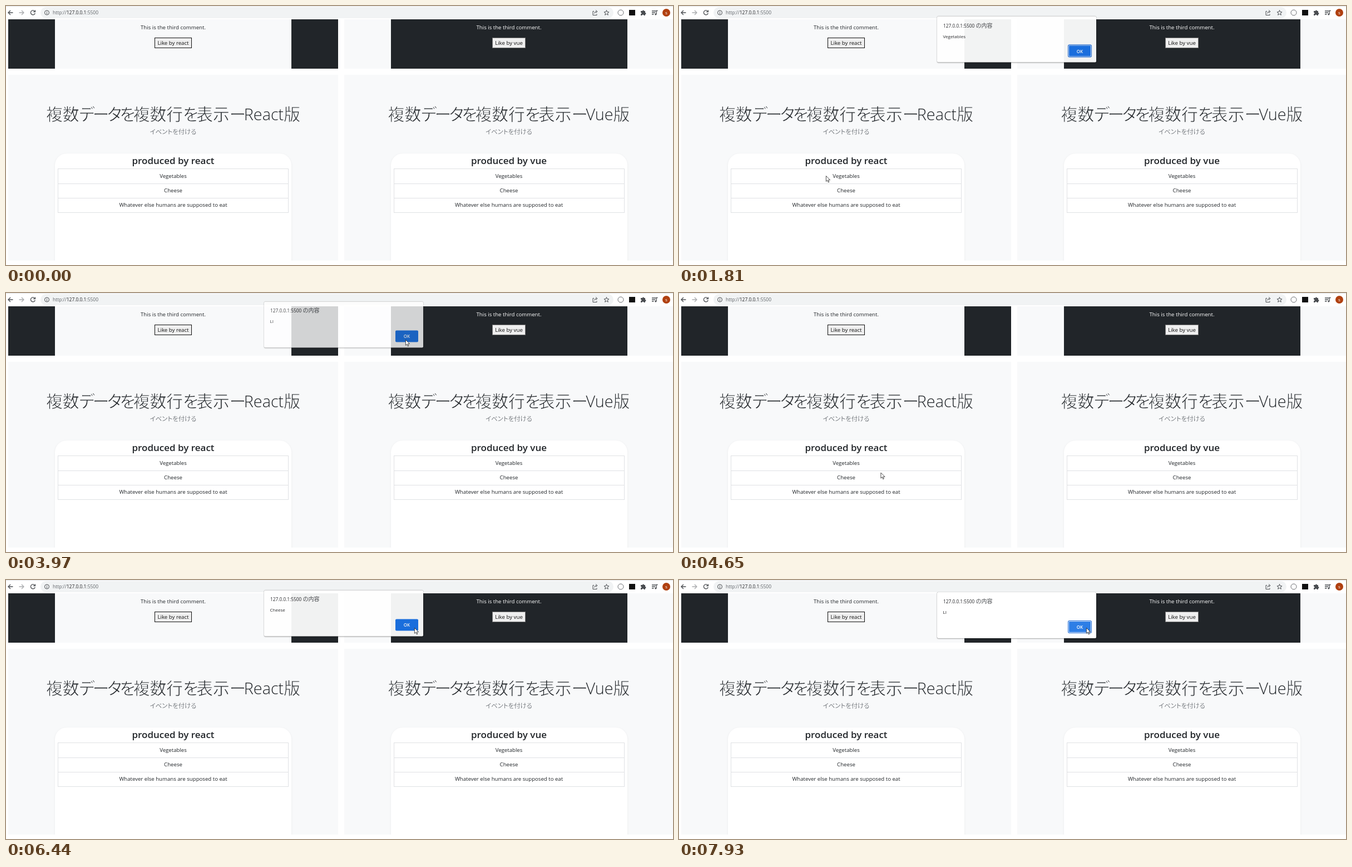
An HTML page for the animation above (8 s loop, 1199 px wide and 467 px high).

```html
<!DOCTYPE html>
<html lang="ja">
<head>
<meta charset="utf-8">
<title>List events</title>
<style>
html, body { margin: 0; width: 100%; height: 100%; overflow: hidden; background: #fff; }
body { position: relative; font: 9.65px/20px "Open Sans", "Noto Sans", sans-serif; color: #212529; }
div { position: absolute; box-sizing: border-box; white-space: nowrap; }
svg { position: absolute; left: 0; top: 0; overflow: visible; }

#bar { left: 0; top: 0; width: 1199px; height: 24px; background: #fff; border-top: 1px solid #e3e5e8; }
#pill { left: 62px; top: 2px; width: 1030px; height: 20px; border-radius: 10px; background: #f1f3f4; }
#url { left: 84px; top: 2px; font-size: 8.45px; color: #5f6368; }
#url b { font-weight: 400; color: #202124; }
#avatar { left: 1180px; top: 5px; width: 14px; height: 14px; border-radius: 50%; background: #b0400f; color: #fff; font-size: 8px; line-height: 13px; text-align: center; }

.col { top: 0; width: 593px; height: 467px; }
.upper { left: 0; top: 24px; width: 593px; height: 89px; }
.lower { left: 0; top: 124px; width: 593px; height: 335px; background: #f8f9fa; overflow: hidden; }
.panel { left: 84px; top: 0; width: 425px; height: 89px; text-align: center; }
.dark { background: #212529; color: #fff; }
.light { background: #f8f9fa; color: #212529; }
.note { left: 0; top: 5px; width: 100%; }
.like { top: 33px; height: 19px; line-height: 17px; font-size: 9.7px; text-align: center; background: #efefef; color: #111; }
.react .like { left: 179px; width: 67px; border: 1.4px solid #111; }
.vue .like { left: 182.5px; width: 60px; border: 1px solid #767676; }

.title, .sub { left: 0; width: 593px; text-align: center; font-family: "Noto Sans CJK JP", "Noto Sans CJK", sans-serif; font-weight: 300; }
.title { top: 49px; font-size: 29.8px; line-height: 40px; }
.title i { font-style: normal; font-feature-settings: "palt"; letter-spacing: -3.4px; }
.title b { font: 300 28.8px/40px "Open Sans", "Noto Sans", sans-serif; }
.sub { top: 92px; font-size: 11.4px; font-feature-settings: "palt"; color: #3c4248; }
.thin .title { -webkit-text-stroke: .85px #f8f9fa; }
.thin .title b { -webkit-text-stroke: 0; }
.thin .sub { -webkit-text-stroke: .3px #f8f9fa; }
.card { left: 84px; top: 142px; width: 425px; height: 230px; border-radius: 21px; background: #fff; box-shadow: 0 1px 4px rgba(0, 0, 0, .06); text-align: center; }
.head { left: 0; top: 2px; width: 100%; font-size: 17px; line-height: 21px; font-weight: 600; }
.list { left: 5px; top: 27px; width: 415px; height: 80px; border: 1px solid #dfe1e4; }
.row { left: 0; width: 100%; height: 27px; line-height: 26px; border-bottom: 1px solid #dfe1e4; }
.row:last-child { border: 0; }

#dialog { left: 464px; top: 22px; width: 286px; height: 83px; background: #fff; border-radius: 2px; box-shadow: 0 0 1px rgba(0, 0, 0, .6), 0 1px 2px rgba(0, 0, 0, .3); color: #202124; }
#name { left: 11px; top: 7px; font-size: 8.3px; }
#name i { font: 300 10px "Noto Sans CJK JP", "Noto Sans CJK", sans-serif; color: #44474b; }
#text { left: 10.5px; top: 26px; font-size: 8px; }
#ok { left: 236px; top: 52px; width: 41px; height: 21px; border-radius: 2px; line-height: 21px; font-size: 8px; font-weight: 600; text-align: center; color: #fff; }
#ok.ring { box-shadow: inset 0 0 0 1px #e6f0fd, 0 0 0 1px #1a66d2; }
#tap { width: 16px; height: 16px; margin: -8px; border-radius: 50%; background: rgba(212, 226, 24, .62); }
</style>
</head>
<body>
<div id="bar"></div>
<div id="pill"></div>
<svg width="1199" height="24" fill="none" stroke="#4a4d51" stroke-width="1.3">
  <path d="M12.500 12H4M8 8 4 12 8 16"/>
  <path d="M23.500 12H32M28 8 32 12 28 16" stroke="#a9abae"/>
  <path d="M51.500 9.300A4 4 0 1 0 52.300 13M52.500 7.500V10.500H49.300"/>
  <g stroke-width="1">
    <circle cx="73.500" cy="12" r="4"/>
    <path d="M73.500 11.500V14.500M73.500 9.500V10.500"/>
    <path d="M1057 9.500H1055V16.500H1062V14.500M1057.500 13.500Q1058 10 1061.500 10M1060 7.500 1063 10 1060 12.500"/>
    <path d="M1079.500 7.500 1080.700 10.700 1084 10.900 1081.400 13 1082.300 16.300 1079.500 14.400 1076.700 16.300 1077.600 13 1075 10.900 1078.300 10.700Z"/>
    <circle cx="1105" cy="12" r="5" stroke="#6d7074"/>
  </g>
  <path d="M1120 7H1131V17H1120Z" fill="#111" stroke="none"/>
  <path d="M1141 9H1144A1.500 1.500 0 0 1 1147 9H1149V12A1.500 1.500 0 0 1 1149 15V17H1146.500A1.500 1.500 0 0 0 1143.500 17H1141V14.500A1.500 1.500 0 0 0 1141 11.500Z" fill="#4a4d51" stroke="none"/>
  <path d="M1161 9H1168M1161 12H1167M1161 15H1164.500M1169 15V8.500H1171.500"/>
  <circle cx="1167.800" cy="15" r="1.500" fill="#4a4d51" stroke="none"/>
</svg>
<div id="url">http://<b>127.0.0.1</b>:5500</div>
<div id="avatar">s</div>

<div id="dialog">
  <div id="name">127.0.0.1:5500 <i>の内容</i></div>
  <div id="text"></div>
  <div id="ok">OK</div>
</div>
<div id="tap"></div>
<svg id="cursor" width="9" height="13">
  <path d="M.4.4V10.300L2.700 8.200 4.300 12 5.900 11.300 4.300 7.700H7.600Z" fill="#fff" stroke="#222" stroke-width=".8"/>
</svg>

<script>
const $ = id => document.getElementById(id);
const clamp = u => Math.max(0, Math.min(1, u));
const smooth = u => u * u * (3 - 2 * u);
const LOOP = 8000;

// Page columns
const items = ['Vegetables', 'Cheese', 'Whatever else humans are supposed to eat'];

function column(left, label, outer, inner) {
  const name = label.toLowerCase();
  const rows = items.map((s, i) => `<div class="row" style="top:${i * 26.2}px">${s}</div>`).join('');
  return `<div class="col ${name}" style="left:${left}px">
    <div class="upper ${outer}"><div class="panel ${inner}">
      <div class="note">This is the third comment.</div>
      <div class="like">Like by ${name}</div>
    </div></div>
    <div class="lower">
      <div class="title">複数<i>データを</i>複数行<i>を</i>表示<i>ー</i><b>${label}</b>版</div>
      <div class="sub">イベントを付ける</div>
      <div class="card"><div class="head">produced by ${name}</div><div class="list">${rows}</div></div>
    </div></div>`;
}
$('bar').insertAdjacentHTML('beforebegin',
  column(4, 'React', 'dark', 'light') + column(607.5, 'Vue', 'light', 'dark'));

// Thin the strokes when no light CJK weight is installed
const pen = document.createElement('canvas').getContext('2d');
const widthAt = weight => {
  pen.font = `${weight} 100px "Noto Sans CJK JP", "Noto Sans CJK", sans-serif`;
  return pen.measureText('React').width;
};
if (widthAt(300) === widthAt(400)) document.body.classList.add('thin');

// Each pointer move eases from wherever the last one ended
const entry = { x: 1082, y: 454, shown: 540 };
const moves = [
  { from: 470, to: 1400, x: 264, y: 306 },
  { from: 1880, to: 2350, x: 757, y: 92 },
  { from: 2380, to: 2720, x: 718, y: 84 },
  { from: 4240, to: 4660, x: 362, y: 324 },
  { from: 4660, to: 4990, x: 344, y: 330 },
  { from: 5540, to: 5980, x: 751, y: 87 },
  { from: 6010, to: 6230, x: 734, y: 86 },
  { from: 7330, to: 7930, x: 732, y: 86 }
];
const alerts = [
  { text: 'Vegetables', open: 1720, close: 2840, hover: 2420 },
  { text: 'LI', open: 2940, close: 3840 },
  { text: 'Cheese', open: 5380, close: 6370 },
  { text: 'LI', open: 6470, close: LOOP, hover: 6840 }
];
const clicks = [1600, 2800, 3840, 5260, 6370];

function pointer(t) {
  let { x, y } = entry;
  for (const m of moves) {
    const u = smooth(clamp((t - m.from) / (m.to - m.from)));
    x += (m.x - x) * u;
    y += (m.y - y) * u;
  }
  return `translate(${x}px, ${y}px)`;
}

const openness = (a, t) => clamp(Math.min((t - a.open) / 180, 1 - (t - a.close) / 140));

function drawDialog(t) {
  const a = alerts.find(a => openness(a, t) > 0);
  $('dialog').style.visibility = a ? 'visible' : 'hidden';
  if (!a) return;
  const away = 1 - openness(a, t);
  const hover = clamp((t - (a.hover ?? LOOP)) / 400);
  $('dialog').style.transform = `translateY(${-7 * away}px)`;
  $('dialog').style.opacity = 1 - .23 * away * away;
  $('text').textContent = a.text;
  $('ok').style.background = `color-mix(in srgb, #2d7ee6 ${hover * 100}%, #1a73e8)`;
  $('ok').className = t > a.close ? '' : 'ring';
}

function draw(t) {
  $('cursor').style.transform = $('tap').style.transform = pointer(t);
  $('cursor').style.visibility = t < entry.shown ? 'hidden' : 'visible';
  $('tap').style.visibility = clicks.some(c => t >= c && t < c + 69) ? 'visible' : 'hidden';
  drawDialog(t);
}

const start = performance.now();
(function tick() {
  draw((performance.now() - start) % LOOP);
  requestAnimationFrame(tick);
})();
</script>
</body>
</html>
```
